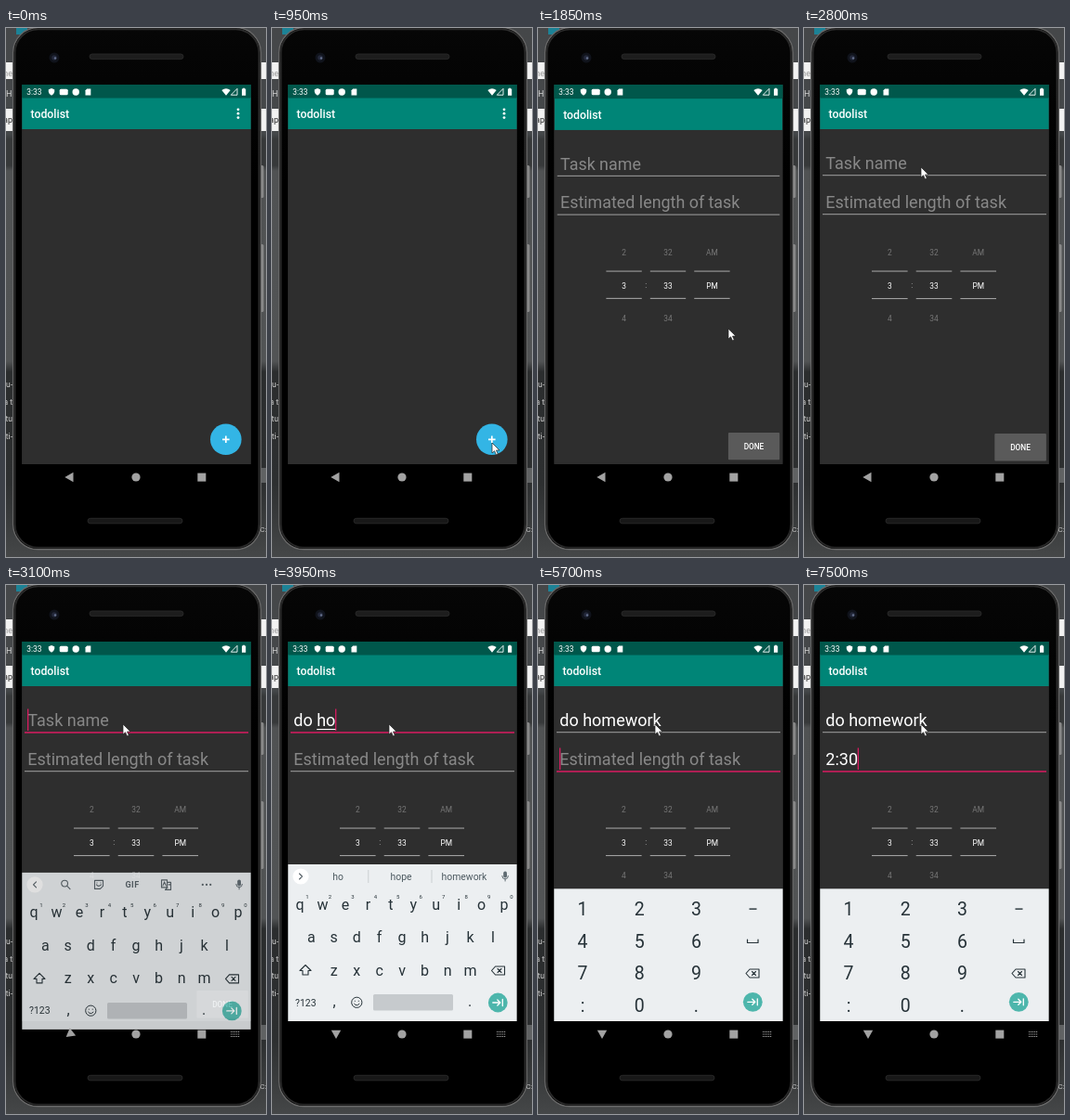
Write an HTML page that moves like this. It is 280 px wide and 570 px high and loops after 8000 ms.

```html
<!DOCTYPE html>
<html lang="en">
<head>
<meta charset="utf-8">
<title>To-do list demo</title>
<style>
html, body { margin: 0; width: 100%; height: 100%; overflow: hidden; background: #3a3b3c; }
svg { display: block; width: 280px; height: 570px; font-family: Roboto, sans-serif; }
text { white-space: pre; }
</style>
</head>
<body>
<svg id="stage" viewBox="0 0 280 570" xmlns="http://www.w3.org/2000/svg">
  <defs>
    <linearGradient id="backdrop" x2="0" y2="1">
      <stop offset="0" stop-color="#454749"/><stop offset=".2" stop-color="#45484a"/>
      <stop offset=".21" stop-color="#37393a"/><stop offset=".26" stop-color="#37393a"/>
      <stop offset=".27" stop-color="#505253"/><stop offset=".63" stop-color="#525455"/>
      <stop offset=".65" stop-color="#2b2d2e"/><stop offset=".86" stop-color="#2d2f30"/>
      <stop offset="1" stop-color="#454748"/>
    </linearGradient>
    <linearGradient id="body" x2="0" y2="1">
      <stop offset="0" stop-color="#060606"/><stop offset=".3" stop-color="#000"/>
    </linearGradient>
    <clipPath id="screen"><rect x="17.3" y="61" width="246.3" height="409"/></clipPath>
  </defs>
  <g id="desk"></g>
  <g id="phone"></g>
  <g clip-path="url(#screen)">
    <rect x="17" y="61" width="247" height="409" fill="#2e2e2e"/>
    <g id="main"></g>
    <g id="form"></g>
  </g>
  <g id="status"></g>
  <g id="keyboard"><g id="letters"></g><g id="digits"></g></g>
  <g id="nav"></g>
  <path id="pointer" d="M0 0V11L2.6 8.7L4.4 12.8L6.3 12L4.5 8H8Z" fill="#fff" stroke="#222" stroke-width=".7"/>
</svg>
<script>
const LOOP = 8000, BLINK = 550;
const PINK = '#d81b60', INK = '#263238', TEAL = '#008577', DARK_TEAL = '#00574b', GREY = '#a2a2a2', PAGE = '#2e2e2e';
const $ = id => document.getElementById(id);

// Markup helpers
const rect = (x, y, w, h, fill, rx = 0, extra = '') =>
  `<rect x="${x}" y="${y}" width="${w}" height="${h}" rx="${rx}" fill="${fill}" ${extra}/>`;
const disc = (x, y, r, fill, extra = '') => `<circle cx="${x}" cy="${y}" r="${r}" fill="${fill}" ${extra}/>`;
const shape = (d, fill, extra = '') => `<path d="${d}" fill="${fill}" ${extra}/>`;
const line = (d, color, width = 1) =>
  `<path d="${d}" fill="none" stroke="${color}" stroke-width="${width}" stroke-linecap="round" stroke-linejoin="round"/>`;
const label = (s, x, y, size, fill, anchor = 'middle', extra = '') =>
  `<text x="${x}" y="${y}" font-size="${size}" fill="${fill}" text-anchor="${anchor}" ${extra}>${s}</text>`;

const bold = 'font-weight="500"';
const page = () => rect(17, 61, 247, 409, PAGE) + rect(17, 61, 247, 15, DARK_TEAL) + rect(17, 75, 247, 34, TEAL) +
  label('todolist', 26.5, 97, 12.3, '#fff', 'start', bold);

$('desk').innerHTML = rect(0, 0, 280, 570, 'url(#backdrop)') +
  rect(11, 0, 12, 7, '#1c8296') +
  rect(0, 37, 280, 18, '#f2f2f2') + rect(0, 87, 280, 24, '#f2f2f2') +
  label('ne', 7, 52, 9, '#999', 'end') + label('H', 6.5, 74, 9, '#ddd', 'end') +
  label('ap', 7, 102, 9, '#222', 'end') +
  ['u-', 'a t', 'otu', 'ti-'].map((s, i) => label(s, 7, 387 + i * 18.7, 8.5, '#ccc', 'end')).join('') +
  label('C:', 273.5, 543, 8, '#ccc', 'start') + rect(270, 474, 10, 16, '#606263');

$('phone').innerHTML = rect(272, 148, 5.5, 35, '#8a8a8a', 1.5) + rect(272, 233, 5.5, 73, '#8a8a8a', 1.5) +
  rect(7.6, -.5, 266.8, 562.3, 'url(#body)', 27, 'stroke="#686868" stroke-width="1.4"') +
  rect(9.6, 1.5, 262.8, 558.3, 'none', 25, 'stroke="#2c2c2c" stroke-width="1.6"') +
  disc(52, 32, 5.5, '#10131b') + disc(52, 32, 2.8, '#23283a') + disc(53, 32.5, 1.2, '#65708c') +
  rect(90, 28, 101, 5.6, '#1d1d1d', 2.8, 'stroke="#2c2c2c" stroke-width=".8"') +
  rect(88, 528.3, 102, 5.6, '#181818', 2.8, 'stroke="#2c2c2c" stroke-width=".8"');

$('status').innerHTML = rect(17.3, 61, 246.3, 14.5, DARK_TEAL) + label('3:33', 22.3, 72, 8.4, '#fff', 'start') +
  shape('M49 65L52.2 66.2V68.8Q51.8 71.5 49 72.7Q46.2 71.5 45.8 68.8V66.2Z', '#fff') +
  rect(57.7, 65.8, 9, 6.4, '#fff', 1.5) + disc(75.2, 69, 3.7, '#fff') +
  shape('M87.2 65.5H91.3V72.5H85.5V67.3Z', '#fff') +
  shape('M232.3 67Q237 63.4 241.7 67L237 72.7Z', '#fff') +
  line('M249 65.7V72.2H242.7Z', '#fff', .9) +
  shape('M255.2 64.7H257V65.5H258.2V72.8H254V65.5H255.2Z', '#fff');

$('main').innerHTML = page() + [87.8, 92.2, 96.6].map(y => disc(250, y, 1.4, '#fff')).join('') +
  disc(236.8, 443.3, 16.8, '#33b5e5') + disc(236.8, 443.3, 16.8, '#fff', 'id="press" opacity="0"') +
  shape('M233 443.3H240.6M236.8 439.5V447.1', 'none', 'stroke="#fff" stroke-width="1.7"');

const pickerColumn = (x, before, now, after) =>
  label(before, x, 244.6, 8.4, '#777') + label(now, x, 280.6, 8.4, '#fff') + label(after, x, 316.4, 8.4, '#777') +
  [262, 291.5].map(y => rect(x - 19.3, y - .5, 38.6, 1.1, '#a0a0a0')).join('');

const field = (id, hint, baseline) =>
  label(hint, 23.3, baseline, 18, '#888', 'start', `id="${id}Hint"`) +
  label('', 23.3, baseline, 18, '#fff', 'start', `id="${id}Text"`) +
  rect(20, baseline + 6.2, 241, 1, GREY, 0, `id="${id}Line"`) +
  rect(23, baseline - 18.5, 1.3, 23.5, PINK, 0, `id="${id}Caret"`);

$('form').innerHTML = page() +
  field('name', 'Task name', 152) + field('length', 'Estimated length of task', 194) +
  rect(48, 155, 0, 1.1, '#fff', 0, 'id="composing"') +
  pickerColumn(92.3, '2', '3', '4') + pickerColumn(140, '32', '33', '34') + pickerColumn(187.7, 'AM', 'PM', '') +
  label(':', 116.2, 280.3, 8.4, '#aaa') +
  rect(205.3, 437, 55.6, 29.5, '#5a5a5a', 1) + label('DONE', 233, 454.9, 8.3, '#fff', 'middle', bold);

// Keyboard parts
const backspace = (x, y) => line(`M${x - 7} ${y}L${x - 3} ${y - 4.5}H${x + 7}V${y + 4.5}H${x - 3}ZM${x - .5} ${y - 2}l4 4m0 -4l-4 4`, INK, 1.1);
const nextKey = (x, y) => disc(x, y, 10.4, '#4db6ac') +
  line(`M${x - 5.5} ${y}H${x + 2.5}M${x - .5} ${y - 3}l3 3l-3 3M${x + 5} ${y - 3.5}v7`, '#fff', 1.3);
const keyRow = (keys, x, y, size = 16) =>
  [...keys].map((k, i) => label(k, x + i * 24.45, y, size, INK)).join('');
const mic = rect(249.2, 308.5, 3.8, 7, '#5f6b72', 1.9) + line('M247.8 313.5a3.3 3.3 0 0 0 6.6 0M251.1 317v2', '#5f6b72', 1);
const icon = d => line(d, '#566167', 1.1);

$('letters').innerHTML = rect(17.3, 301, 246.3, 169, '#eceff1') + disc(31, 314, 8.6, '#fff') + mic +
  '<g id="tools">' + icon('M32.5 311l-3 3l3 3') +
  icon('M66.5 312.7a3.4 3.4 0 1 1 -6.8 0a3.4 3.4 0 1 1 6.8 0M65.6 315.3l3.4 3.4') +
  icon('M95.5 309.5h9v6l-3 3h-6ZM97.5 314q2 3 5 0M98 312v.1M102 312v.1') +
  label('GIF', 136, 317.3, 9, '#566167', 'middle', 'font-weight="700" letter-spacing=".5"') +
  icon('M167.5 309h6v8h-6ZM169 315l1.6-4l1.6 4M174 311.5h3.5v8h-6l2.5-2.5M175 314h2') +
  [211.8, 216, 220.2].map(x => disc(x, 314, 1.1, '#566167')).join('') + '</g>' +
  '<g id="words">' + icon('M29.5 311l3 3l-3 3') + rect(103.4, 307, .8, 14, '#c3c8cb') + rect(171.6, 307, .8, 14, '#c3c8cb') +
  [71, 139, 207].map(x => label('', x, 317.7, 10.4, '#4c5960')).join('') + '</g>' +
  keyRow('qwertyuiop', 30, 349.5) + keyRow('1234567890', 38, 338.3, 6) +
  keyRow('asdfghjkl', 42.3, 385.2) + keyRow('zxcvbnm', 66.8, 420.5) +
  line('M36 409.5L42 415.5H39V420H33V415.5H30Z', INK, 1.1) + backspace(243.5, 415.5) +
  label('?123', 36.3, 453.5, 10.4, INK) + label(',', 67, 454, 16, INK) + label('.', 213, 454, 16, INK) +
  disc(91.3, 449.8, 5.6, 'none', `stroke="${INK}"`) + line('M88.6 451.3q2.7 3.2 5.4 0M89.3 448.2v.2M93.3 448.2v.2', INK, 1) +
  rect(109, 441, 86, 17.5, '#c6cacd', 1.5) + nextKey(243.3, 450);

$('digits').innerHTML = rect(17.3, 327.3, 246.3, 142.7, '#eceff1') +
  ['123', '456', '789', ':0.'].map((row, r) =>
    [...row].map((k, c) => label(k, 48 + c * 61.2, 356 + r * 34.7, 19.5, INK)).join('')).join('') +
  rect(227.5, 348.4, 8, 1.4, INK) + line('M225.5 382v3.5h11.5v-3.5', INK, 1.2) +
  backspace(231, 418.5) + nextKey(231.3, 449.3);

$('nav').innerHTML = shape('M-5 0L4.2 -5.2V5.2Z', GREY, 'id="back"') + disc(140, 484, 4.6, GREY) + rect(206.3, 479.6, 9, 9, GREY) +
  `<g id="switcher" stroke="${GREY}" stroke-width="1.2" stroke-dasharray="1.2 .8">` +
  '<path d="M242 481.5H252M242 484H252M242 486.5H252"/></g>';

// Story: typing times are one per character
const task = { text: 'do homework', times: [3300, 3420, 3560, 3720, 3880, 4000, 4120, 4260, 4380, 4490, 4600] };
const span = { text: '2:30', times: [6170, 6650, 7200, 7450] };
const NAME_FOCUS = 2850, KEYS_UP = 3020, LENGTH_FOCUS = 5250, OPEN = 1630;
const guesses = ['', 'd do did', 'do does don’t', 'you not it', 'h have how', 'ho hope homework',
  'hom home homework', 'home homework homes', 'homew homework home', 'homewo homework home',
  'homewor homework home', 'homework homeworks homemade'].map(s => s.split(' '));
const pointerPath = [[450, 246, 538], [850, 237, 447], [1480, 237, 447], [1820, 205, 324], [1880, 205, 324], [2450, 126, 150]];

const clamp = v => Math.max(0, Math.min(1, v));
const progress = (t, start, duration) => clamp((t - start) / duration);
const set = (id, attrs) => { for (const k in attrs) $(id).setAttribute(k, attrs[k]); };
const show = (id, on) => set(id, { visibility: on ? 'inherit' : 'hidden' });

function pointerAt(t) {
  let i = 0;
  while (i < pointerPath.length - 2 && t >= pointerPath[i + 1][0]) i++;
  const [t0, x0, y0] = pointerPath[i], [t1, x1, y1] = pointerPath[i + 1];
  const u = progress(t, t0, t1 - t0), p = u * u * (3 - 2 * u);
  return [x0 + (x1 - x0) * p, y0 + (y1 - y0) * p];
}

function drawField(id, t, entry, focusTime, focused) {
  const count = entry.times.filter(time => time <= t).length;
  const lastEdit = count ? entry.times[count - 1] : focusTime;
  const node = $(id + 'Text');
  node.textContent = entry.text.slice(0, count);
  show(id + 'Hint', !count);
  set(id + 'Line', { fill: focused ? PINK : GREY, height: focused ? 1.5 : 1 });
  set(id + 'Caret', { x: 23 + (count ? node.getComputedTextLength() : 0) });
  show(id + 'Caret', focused && Math.floor((t - lastEdit) / BLINK) % 2 === 0);
  return count;
}

function drawComposing(count, active) {
  const start = count > 3 ? 3 : 0;
  const on = active && count > 0 && count !== 3;
  show('composing', on);
  if (!on) return;
  const node = $('nameText');
  const x = start ? node.getSubStringLength(0, start) : 0;
  set('composing', { x: 23.3 + x, width: node.getSubStringLength(start, count - start) });
}

function update(t) {
  const [px, py] = pointerAt(t);
  set('pointer', { transform: `translate(${px} ${py})` });
  show('pointer', t >= 450);

  const pressed = progress(t, 1330, 120) * (1 - progress(t, 1500, 150));
  set('press', { opacity: .22 * pressed });

  const opening = 1 - (1 - progress(t, OPEN, 400)) ** 4;
  const zoom = s => `translate(140.5 265.5) scale(${s}) translate(-140.5 -265.5)`;
  set('main', { transform: zoom(1 + .15 * opening), opacity: 1 - progress(t, OPEN + 40, 120) });
  set('form', { transform: zoom(.85 + .15 * opening), opacity: progress(t, OPEN, 80) });

  const onLength = t >= LENGTH_FOCUS;
  const count = drawField('name', t, task, NAME_FOCUS, t >= NAME_FOCUS && !onLength);
  drawField('length', t, span, LENGTH_FOCUS, onLength);
  drawComposing(count, !onLength);

  const u = progress(t, KEYS_UP, 190);
  set('keyboard', { transform: `translate(0 ${27 * (1 - u) ** 2})`, opacity: Math.min(1, u * 2) });
  show('letters', !onLength);
  show('digits', onLength);
  show('tools', !count);
  show('words', count > 0);
  $('words').querySelectorAll('text').forEach((node, i) => node.textContent = guesses[count][i] || '');

  set('back', { transform: `translate(${68.3 + .7 * u} 484) rotate(${-90 * u})` });
  show('switcher', u > 0);
}

function frame(now) {
  update(now % LOOP);
  requestAnimationFrame(frame);
}
update(0);
requestAnimationFrame(frame);
</script>
</body>
</html>
```
